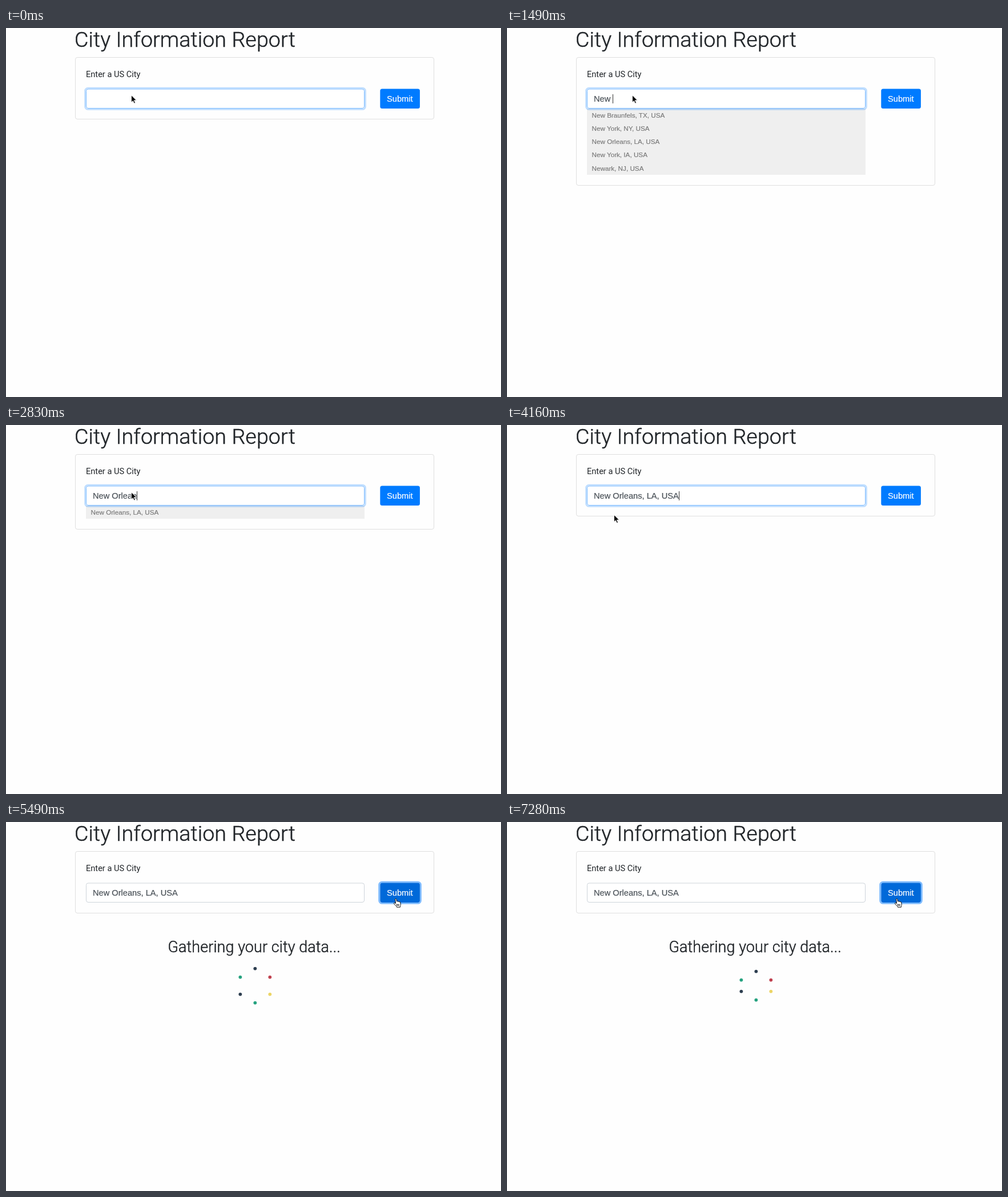
An HTML page that plays this animation: 867 px wide and 646 px high, repeating every 8 s.

```html
<!DOCTYPE html>
<html lang="en">
<head>
<meta charset="utf-8">
<title>City Information Report</title>
<style>
html, body { margin: 0; width: 100%; height: 100%; overflow: hidden; background: #fefefe; }
svg { display: block; width: 867px; height: 646px; }
text { white-space: pre; }
.head { font-family: Roboto, sans-serif; font-weight: 300; fill: #212529; stroke: #212529; stroke-width: .5; }
.label { font: 14.6px Roboto, sans-serif; fill: #212529; }
.field { font: 14.63px "Liberation Sans", Arial, sans-serif; fill: #495057; stroke: #495057; stroke-width: .2; }
.item { font: 11.7px "Liberation Sans", Arial, sans-serif; fill: #777; stroke: #777; stroke-width: .15; }
.light { fill: #fff; stroke: #fff; }
</style>
</head>
<body>
<svg viewBox="0 0 867 646" xmlns="http://www.w3.org/2000/svg">
  <text class="head" x="120" y="33" font-size="37.6" letter-spacing=".1">City Information Report</text>
  <rect id="card" x="121.5" y="51.5" width="628" height="108" rx="3.5" fill="none" stroke="#dfdfdf"/>
  <text class="label" x="140" y="86">Enter a US City</text>

  <g id="list">
    <rect id="panel" x="140" y="141" width="488" fill="#efefef"/>
    <g id="items"></g>
  </g>

  <rect id="inputRing" x="138.6" y="105.1" width="490.8" height="37.3" rx="5" fill="none" stroke="#007bff" stroke-opacity=".25" stroke-width="2.8"/>
  <rect id="input" x="140.5" y="107" width="487" height="33.5" rx="3.5" fill="#fff"/>
  <text id="typed" class="field" x="152" y="129"></text>
  <rect id="caret" y="116" width="1" height="16" fill="#333"/>

  <rect id="btnRing" x="653.6" y="105.1" width="72.8" height="37.3" rx="5" fill="none" stroke="#007bff" stroke-opacity=".5" stroke-width="2.8"/>
  <rect id="btn" x="655.3" y="106.6" width="69.6" height="34.4" rx="3.5"/>
  <text class="field light" x="667" y="129">Submit</text>

  <g id="wait">
    <text class="head" x="283.6" y="228" font-size="26.8" letter-spacing=".15">Gathering your city data...</text>
    <g id="dots"></g>
  </g>

  <path id="arrow" d="M0 0V12.4L2.9 9.7L4.9 14.3L7 13.4L5 8.9H9Z" fill="#000" stroke="#fff" stroke-width=".9" stroke-linejoin="round"/>
  <path id="hand" d="M2.6 1.6C2.6 .2 4.6 .1 4.9 1.5L5.6 5.2C6.2 4.5 7.3 4.7 7.6 5.6C8.3 5 9.5 5.3 9.7 6.2C10.6 5.7 11.7 6.2 11.8 7.2L12.2 10.4C12.3 12 11.4 13 11.3 15.3H5.5C5.2 13.5 2.4 11.8 .7 9.2C0 8 1.4 7 2.5 8L3.6 9.1ZM7.1 10V13M9 10V13M5.3 10V12.6" fill="#fff" stroke="#000" stroke-width="1" stroke-linejoin="round"/>
</svg>
<script>
const LOOP = 8000, TICK = 148.6, NS = 'http://www.w3.org/2000/svg';
const $ = id => document.getElementById(id);
const set = (el, attrs) => { for (const k in attrs) el.setAttribute(k, attrs[k]); };
const show = (el, on) => el.setAttribute('visibility', on ? 'inherit' : 'hidden');
const add = (tag, parent, attrs) => {
  const el = document.createElementNS(NS, tag);
  set(el, attrs);
  return parent.appendChild(el);
};
// Latest entry whose start tick has been reached.
const latest = (track, k) => track.filter(e => e[0] <= k).pop();
const clamp = v => Math.max(0, Math.min(1, v));

const CITY = 'New Orleans, LA, USA';
const typing = [[0, 0], [5, 1], [7, 3], [10, 4], [12, 5], [13, 6], [15, 7], [16, 8], [17, 9], [19, 10], [27, CITY.length]];
const carets = [[0, 0], [4, 1], [20, 0], [27, 1], [31, 0]];
const lists = [
  [0],
  [7, 'New Braunfels, TX', 'New York, NY', CITY, 'Newark, NJ', 'Norfolk, VA'],
  [10, 'New Braunfels, TX', 'New York, NY', CITY, 'New York, IA', 'Newark, NJ'],
  [12, CITY, 'New Oxford, PA', 'New Orleans, IN', 'New Orchard, NY', 'New Richmond, WI'],
  [15, CITY, 'New Orleans, IN', 'Orleans, MA', 'Orland Park, IL', 'Orlando, FL'],
  [17, CITY, 'New Orleans, IN', 'Orleans, MA', 'Orleans, VT', 'Orleans, IN'],
  [19, CITY],
  [27]
];
const pointer = [
  [0, 219.5, 117.8], [22, 214, 113], [23, 205, 126], [24, 194, 142], [25, 187.5, 151],
  [28, 187.5, 157.3], [31, 330, 164], [32, 575, 153], [33, 675, 134.8], [34, 679, 133.8]
];
const HOVER = 33, CLICK = 35, WAIT = 36;

const rows = Array.from({ length: 5 }, (_, i) =>
  add('text', $('items'), { class: 'item', x: 148.5, y: 156.8 + i * 23.2 }));
const colors = ['#2d3e50', '#c0414f', '#ecd566', '#25a27f', '#2d3e50', '#25a27f'];
const dots = colors.map(fill => add('circle', $('dots'), { fill }));

function drawList(k) {
  const names = latest(lists, k).slice(1), h = names.length * 23.2;
  show($('list'), names.length);
  set($('panel'), { height: h });
  set($('card'), { height: 108 + Math.round(h) });
  rows.forEach((row, i) => {
    const name = names[i] || '';
    row.textContent = !name || name === CITY ? name : name + ', USA';
  });
}

function drawInput(k) {
  const text = CITY.slice(0, latest(typing, k)[1]), focus = k < CLICK;
  $('typed').textContent = text;
  const w = text ? $('typed').getComputedTextLength() : 0;
  set($('caret'), { x: Math.round(152 + w) });
  show($('caret'), latest(carets, k)[1]);
  show($('inputRing'), focus);
  set($('input'), { stroke: focus ? '#80bdff' : '#ced4da' });
}

// The ring closes to a point, opens again, then its halves bob inwards.
function drawDots(k) {
  const size = k < 40 ? 1 - .87 * clamp((k - 37) / 3) : .13 + .87 * clamp((k - 40) / 3);
  const top = 5 * clamp((k - 43) / 3);
  const low = k < 46 ? 12 * clamp((k - 43) / 3) : 12 - 7 * clamp((k - 46) / 3);
  dots.forEach((dot, i) => {
    const a = i * Math.PI / 3, up = Math.cos(a) > 0;
    set(dot, {
      cx: 436.3 + 30 * size * Math.sin(a),
      cy: 286.6 - 30 * size * Math.cos(a) + (up ? top : -low),
      r: 2.9 * Math.max(size, .2)
    });
  });
}

function draw(t) {
  const k = Math.floor((t + 10) / TICK);
  const [, x, y] = latest(pointer, k), hover = k >= HOVER;
  drawList(k);
  drawInput(k);
  set($('btn'), { fill: hover ? '#0069d9' : '#007bff' });
  show($('btnRing'), k >= CLICK);
  show($('wait'), k >= WAIT);
  drawDots(k);
  show($('arrow'), !hover);
  show($('hand'), hover);
  set($(hover ? 'hand' : 'arrow'), { transform: `translate(${x} ${y})` });
}

function loop() {
  draw(performance.now() % LOOP);
  requestAnimationFrame(loop);
}
loop();
</script>
</body>
</html>
```
